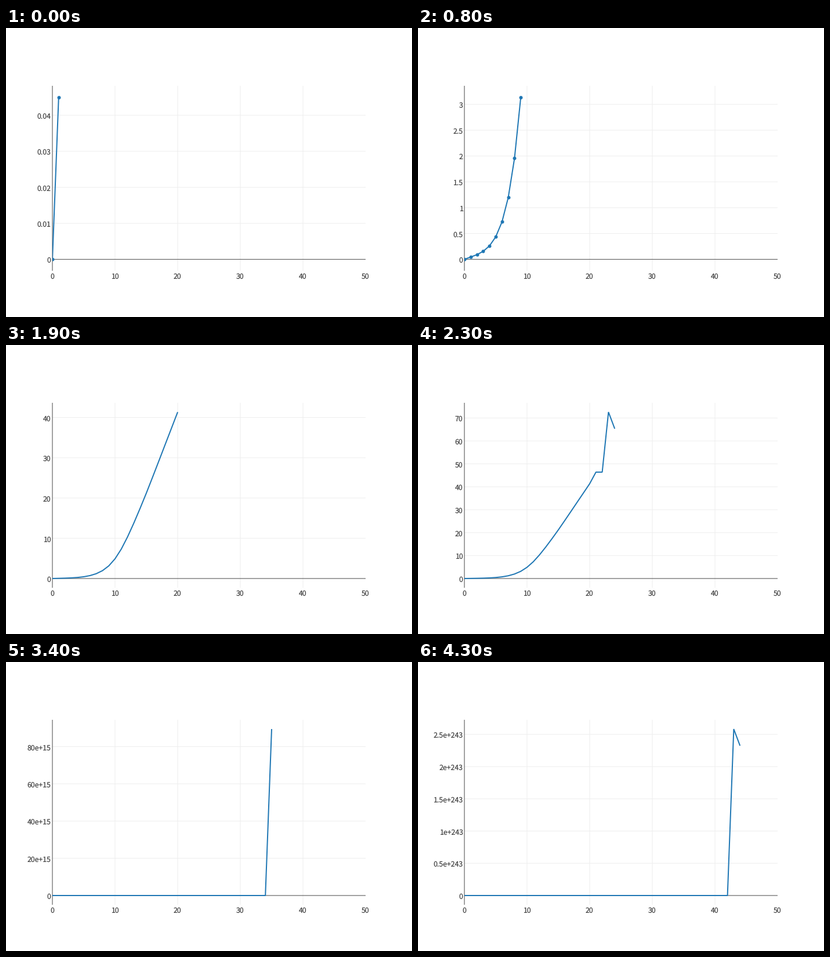
Write a matplotlib script that moves like this. It is 700 px wide and 500 px high and loops after 4900 ms.

```python
import math

import matplotlib.pyplot as plt
from matplotlib.animation import FuncAnimation
from matplotlib.patches import Rectangle

W, H, DPI = 700, 500, 100
LEFT, TOP, PLOT_W, PLOT_H = 80, 100, 540, 320
RIGHT, BOTTOM = LEFT + PLOT_W, TOP + PLOT_H
STEP = PLOT_W / 50
PX = 72 / DPI
BLUE, DARK, GRID = "#1f77b4", "#444444", "#eeeeee"
SUFFIX = {0: "", 3: "k", 6: "M", 9: "B", 12: "T"}

plt.rcParams.update({
    "font.family": "Noto Sans CJK JP",
    "font.size": 12.3 * PX,
    "text.hinting": "none",
    "path.simplify": False,
})


def make_data():
    """Smooth growth, then a sawtooth whose peaks square each time."""
    ys = [0, .045, .09, .1557, .26, .435, .725, 1.197, 1.957, 3.138, 4.9,
          7.32, 10.35, 13.77, 17.43, 21.23, 25.2, 29.22, 33.27, 37.3, 41.35,
          46.4, 46.4]
    peaks = [72.6, 163.9, 581.2, 5467, 4.25e5, 2.53e9, 8.944e16]
    for _ in range(4):
        peaks.append(0.0139905 * peaks[-1] ** 2)
    for p in peaks:
        ys += [p, 0.9 * p]
    return ys


DATA = make_data()
LAST = len(DATA) - 1

fig = plt.figure(figsize=(W / DPI, H / DPI), dpi=DPI, facecolor="white")
ax = fig.add_axes([0, 0, 1, 1])


def rule(xs, ys, color):
    ax.plot(xs, ys, color=color, lw=PX, solid_capstyle="butt", snap=False)


def label(x, y, text, ha):
    ax.text(x, y, text, ha=ha, va="baseline", color=DARK)


def tick_step(span):
    rough = span / 9
    base = 10.0 ** math.floor(math.log10(rough))
    return base * next(m for m in (1, 2, 5, 10) if m * base >= rough and m > 1)


def tick_exponent(top):
    e = math.floor(math.log10(top) + 0.01)
    return 3 * round((e - 1) / 3) if abs(e) > 3 else 0


def tick_text(value, exp):
    if value == 0:
        return "0"
    return f"{value / 10.0 ** exp:.6g}" + SUFFIX.get(exp, f"e+{exp}")


def draw(i):
    ax.clear()
    ax.set_axis_off()
    ax.set_xlim(0, W)
    ax.set_ylim(H, 0)

    ys = DATA[:min(i + 1, LAST) + 1]
    dots = len(ys) < 20
    pad = 19.75 if dots else 16
    scale = (PLOT_H - 2 * pad) / max(ys)
    zero = BOTTOM - pad
    top = (PLOT_H - pad) / scale
    step = tick_step(PLOT_H / scale)
    exp = tick_exponent(top)
    ticks = [k * step for k in range(int(top / step) + 1)]

    for v in range(10, 50, 10):
        rule([LEFT + v * STEP] * 2, [TOP, BOTTOM], GRID)
    for v in ticks[1:]:
        rule([LEFT, RIGHT], [zero - v * scale] * 2, GRID)
    rule([LEFT, LEFT], [TOP, BOTTOM], DARK)
    rule([LEFT, RIGHT], [zero, zero], DARK)

    area = Rectangle((LEFT, TOP), PLOT_W, PLOT_H, transform=ax.transData)
    curve, = ax.plot([LEFT + k * STEP for k in range(len(ys))],
                     [zero - y * scale for y in ys],
                     color=BLUE, lw=2 * PX, solid_joinstyle="bevel",
                     solid_capstyle="butt", snap=False,
                     marker="o" if dots else None, ms=6 * PX, mew=0)
    curve.set_clip_path(area)

    for v in range(0, 51, 10):
        label(LEFT + v * STEP, 434, str(v), "center")
    for v in ticks:
        label(77.5, zero - v * scale + 6, tick_text(v, exp), "right")
    return []


anim = FuncAnimation(fig, draw, frames=49, interval=100, init_func=lambda: [],
                     repeat=True, repeat_delay=0, blit=False)
plt.show()
```
